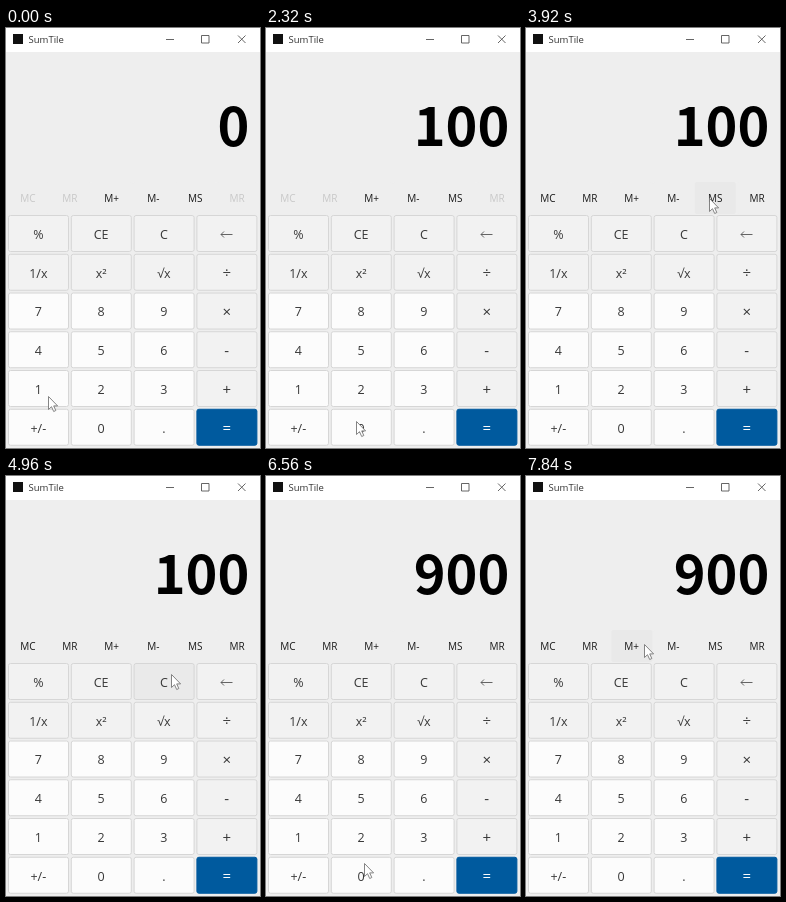
Animation of 254 by 420 pixels, one loop 8000 ms. Source, as an HTML page:

```html
<!DOCTYPE html>
<html lang="en">
<head>
<meta charset="utf-8">
<title>SumTile</title>
<style>
  html, body { margin: 0; width: 100%; height: 100%; overflow: hidden; background: #eee; }
  svg { display: block; width: 254px; height: 420px; font-family: "Open Sans", "Noto Sans", sans-serif; }
  #display { font: 700 54px "Noto Sans CJK JP", "Noto Sans CJK SC", "Noto Sans CJK", "Open Sans", sans-serif; text-anchor: end; }
  .key { stroke: #d6d6d6; }
  .equals { stroke: #005a9e; }
  .label { text-anchor: middle; fill: #383838; font-size: 12.5px; }
  .op { font-size: 15px; }
  .mem { font-size: 10px; }
  .line { fill: none; stroke: #555; stroke-width: .9; }
</style>
</head>
<body>
<svg id="stage" viewBox="0 0 254 420">
  <rect width="254" height="24" fill="#fff"/>
  <rect x="7" y="6" width="10" height="10" fill="#111"/>
  <text x="22.5" y="15" font-size="9.5" fill="#333">SumTile</text>
  <path class="line" d="M160 11.5h8M195.5 7.5h7.5v7.5h-7.5zM232 7.5l7.5 7.5m0-7.5l-7.5 7.5"/>
  <text id="display" x="243.3" y="118"></text>
  <g id="keys"></g>
  <path id="pointer" d="M.5 .5V13.5L3.5 10.7L5.7 15.5L7.8 14.5L5.7 9.9H9.6Z" fill="#fff" stroke="#777" stroke-width=".9"/>
</svg>
<script>
const LOOP = 8000, STEP = 80;
const $ = id => document.getElementById(id);
const keys = $('keys'), pads = [], memory = [];

function add(tag, attrs, text = '') {
  const el = document.createElementNS('http://www.w3.org/2000/svg', tag);
  for (const name in attrs) el.setAttribute(name, attrs[name]);
  el.textContent = text;
  return keys.appendChild(el);
}

// A pad is a rectangle that darkens under the pointer.
function pad(x, y, w, h, fill, hover, cls) {
  const el = add('rect', { x, y, width: w, height: h, rx: 2, class: cls, fill });
  pads.push({ el, x, y, w, h, fill, hover });
}

['MC', 'MR', 'M+', 'M-', 'MS', 'MR'].forEach((name, i) => {
  pad(2 + 41.7 * i, 154, 41, 32, '#eee', '#e9e9e9', 'memPad');
  memory.push(add('text', { x: 22 + 41.8 * i, y: 173.7, class: 'label mem' }, name));
});

const rows = ['% CE C ←', '1/x x² √x ÷', '7 8 9 ×', '4 5 6 -', '1 2 3 +', '+/- 0 . ='];
rows.forEach((row, r) => row.split(' ').forEach((name, c) => {
  const x = 2.5 + 62.8 * c, y = 187.5 + 38.75 * r, cx = 32.3 + 62.8 * c;
  const grey = r < 2 || c === 3, equals = name === '=';
  const fill = equals ? '#005a9e' : grey ? '#f2f2f2' : '#fcfcfc';
  pad(x, y, 60, 36, fill, grey && !equals ? '#eaeaea' : fill, equals ? 'equals' : 'key');
  if (name === '←') {
    add('path', { class: 'line', d: 'M226.5 206.5H215m3-3l-3 3l3 3' });
  } else {
    const op = c === 3;
    const label = add('text', { x: cx, y: y + (op ? 24.2 : 23.4), class: op ? 'label op' : 'label' }, name);
    if (equals) label.style.fill = '#fff';
  }
}));

// start, end, from, to, sideways bow
const moves = [
  [1280, 1760, [42, 368], [90, 393], 0],
  [2800, 3600, [90, 393], [183, 170], 0],
  [3920, 4720, [183, 170], [165, 198], 0],
  [4960, 5440, [165, 198], [153, 279], 0],
  [5680, 6040, [153, 279], [98, 387], 0],
  [6720, 7600, [98, 387], [118, 168], 40]
];

const readings = [
  [0, '0'], [1280, '1'], [1920, '10'], [2160, '100'],
  [5040, '0'], [5760, '9'], [6320, '90'], [6480, '900']
];

const latest = (list, t) => list.filter(item => item[0] <= t).pop();

function pointerAt(t) {
  const [start, end, from, to, bow] = latest(moves, t) || moves[0];
  const u = Math.max(0, Math.min(1, (t - start) / (end - start)));
  const s = u * u * (3 - 2 * u);
  return [
    from[0] + (to[0] - from[0]) * s + bow * Math.sin(Math.PI * s),
    from[1] + (to[1] - from[1]) * s
  ];
}

function draw(now) {
  const t = Math.floor(now % LOOP / STEP) * STEP;
  const [px, py] = pointerAt(t);
  $('display').textContent = latest(readings, t)[1];
  $('pointer').setAttribute('transform', `translate(${px} ${py})`);
  for (const p of pads) {
    const over = px >= p.x && px < p.x + p.w && py >= p.y && py < p.y + p.h;
    p.el.setAttribute('fill', over ? p.hover : p.fill);
  }
  memory.forEach((label, i) => {
    const active = t >= 3920 || (i > 1 && i < 5);
    label.style.fill = active ? '#1a1a1a' : '#c8c8c8';
  });
}

let origin;
function tick(now) {
  origin ??= now;
  draw(now - origin);
  requestAnimationFrame(tick);
}
draw(0);
requestAnimationFrame(tick);
</script>
</body>
</html>
```
